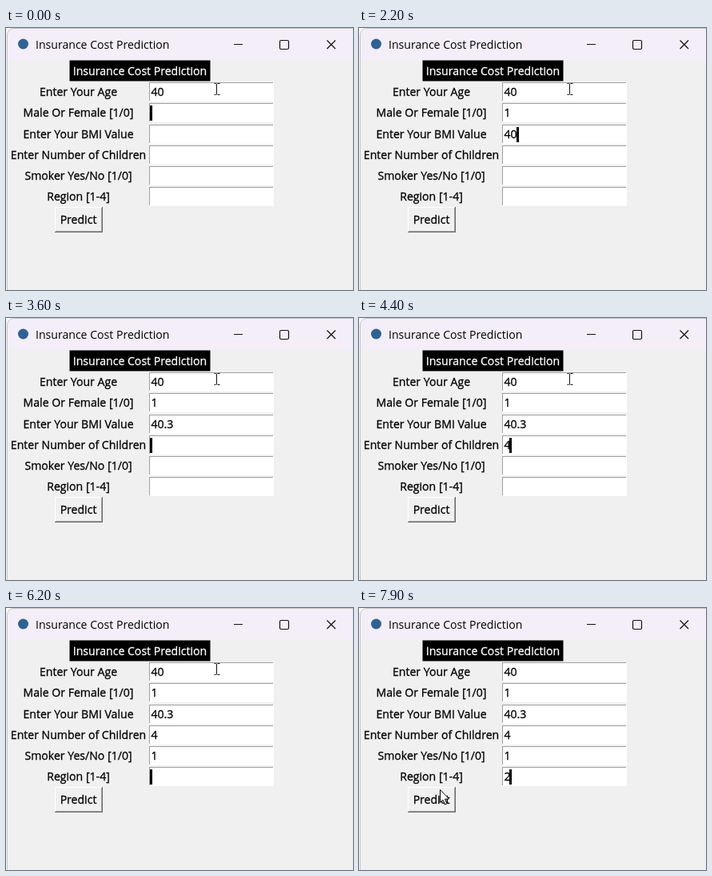
An HTML page with a canvas for the animation above (8 s loop, 434 by 328 pixels).

```html
<!DOCTYPE html>
<html lang="en">
<head>
<meta charset="utf-8">
<title>Insurance Cost Prediction</title>
<style>
  html, body { margin: 0; width: 100%; height: 100%; overflow: hidden; background: #f0f0f0; }
  canvas { display: block; }
</style>
</head>
<body>
<canvas id="stage" width="434" height="328"></canvas>
<script>
const ctx = document.getElementById('stage').getContext('2d');
const LOOP = 8000, STEP = 100;
const LABELS = ['Enter Your Age', 'Male Or Female [1/0]', 'Enter Your BMI Value',
  'Enter Number of Children', 'Smoker Yes/No [1/0]', 'Region [1-4]'];

// [time, focused row, text in that row]
const EVENTS = [
  [0, 1, ''], [700, 1, '1'],
  [1500, 2, ''], [1800, 2, '4'], [2100, 2, '40'], [2700, 2, '40.'], [3000, 2, '40.3'],
  [3500, 3, ''], [4200, 3, '4'],
  [4700, 4, ''], [5200, 4, '1'],
  [5800, 5, ''], [6500, 5, '2']
];

// [time, x, y] of the pointer
const POINTER = [[0, 263, 76], [7100, 263, 76], [7300, 225, 185],
  [7500, 150, 282], [7700, 101, 227], [LOOP, 101, 227]];

const rowY = i => Math.round(80 + i * 26.25);

function rect(color, x, y, w, h) {
  ctx.fillStyle = color;
  ctx.fillRect(x, y, w, h);
}

// A hairline outline gives the form text its heavier weight
function text(s, x, y, { align = 'left', color = '#000', weight = 0.3 } = {}) {
  ctx.fillStyle = ctx.strokeStyle = color;
  ctx.textAlign = align;
  ctx.fillText(s, x, y);
  if (weight) {
    ctx.lineWidth = weight;
    ctx.strokeText(s, x, y);
  }
}

function line(points, width = 1, color = '#111') {
  ctx.strokeStyle = color;
  ctx.lineWidth = width;
  ctx.beginPath();
  points.forEach(([x, y]) => ctx.lineTo(x, y));
  ctx.stroke();
}

// Nested rectangles, outermost first: top/left colour, bottom/right colour
function bevel(x, y, w, h, rings, fill) {
  for (const [topLeft, bottomRight] of rings) {
    rect(bottomRight, x, y, w, h);
    rect(topLeft, x, y, w - 1, h - 1);
    x++; y++; w -= 2; h -= 2;
  }
  rect(fill, x, y, w, h);
}

function drawWindow() {
  rect('#f0f0f0', 0, 0, 434, 328);
  rect('#fafafa', 0, 0, 434, 40);
  ctx.fillStyle = '#f3eef8';
  ctx.beginPath();
  ctx.roundRect(2, 1, 440, 39, [8, 0, 0, 0]);
  ctx.fill();
  rect('#f3eef8', 2, 40, 341, 1);
  rect('#fafafa', 0, 8, 1, 320);
  rect('#c4c4c4', 1, 8, 1, 320);
  line([[9, 0.5], [434, 0.5]], 1, '#c4c4c4');
  ctx.beginPath();
  ctx.arc(9.5, 8.5, 8, Math.PI, Math.PI * 1.5);
  ctx.stroke();

  ctx.fillStyle = '#2f6294';
  ctx.beginPath();
  ctx.arc(21.5, 20, 6.5, 0, 7);
  ctx.fill();
  text('Insurance Cost Prediction', 37, 26, { weight: 0 });

  line([[285, 20.5], [296, 20.5]]);
  ctx.lineWidth = 1.2;
  ctx.beginPath();
  ctx.roundRect(342.5, 15.5, 11, 11, 1.5);
  ctx.stroke();
  line([[401.5, 15.5], [412, 26]], 1.2);
  line([[412, 15.5], [401.5, 26]], 1.2);
}

function drawForm(values) {
  rect('#000', 79.5, 40.5, 176, 26);
  text('Insurance Cost Prediction', 167.5, 59, { align: 'center', color: '#fff' });
  LABELS.forEach((label, i) => {
    const y = rowY(i);
    text(label, 90.5, y + 5, { align: 'center' });
    bevel(179, y - 12, 156, 24, [['#a0a0a0', '#fff']], '#fff');
    text(values[i], 181.5, y + 5);
  });
  bevel(61, 224, 60, 32, [['#fff', '#696969'], ['#f0f0f0', '#a0a0a0']], '#f0f0f0');
  text('Predict', 90.5, 245, { align: 'center' });
}

function drawPointer(t) {
  const i = POINTER.findIndex(p => p[0] > t);
  const [t0, x0, y0] = POINTER[i - 1], [t1, x1, y1] = POINTER[i];
  const k = (t - t0) / (t1 - t0);
  const x = Math.round(x0 + (x1 - x0) * k), y = Math.round(y0 + (y1 - y0) * k);
  const overEntry = x > 179 && x < 335 && y > 67 && y < 223;
  ctx.save();
  ctx.translate(x + 0.5, y + 0.5);
  if (overEntry) {
    line([[0, -7], [0, 7]]);
    for (const s of [-7, 7]) {
      line([[-3, s], [-1, s]]);
      line([[1, s], [4, s]]);
    }
  } else {
    ctx.beginPath();
    [[0, 0], [0, 16], [3.5, 12.7], [6, 18.5], [8.5, 17.4], [6, 11.8], [11, 11.5]]
      .forEach(([px, py]) => ctx.lineTo(px, py));
    ctx.closePath();
    ctx.fillStyle = '#fff';
    ctx.fill();
    ctx.strokeStyle = '#000';
    ctx.lineWidth = 1;
    ctx.stroke();
  }
  ctx.restore();
}

function draw(now) {
  const t = Math.floor(now % LOOP / STEP) * STEP;
  const values = ['40', '', '', '', '', ''];
  let since = 0, row = 1;
  for (const [time, r, value] of EVENTS) {
    if (time > t) break;
    values[r] = value;
    since = time;
    row = r;
  }
  ctx.font = '14.1px "Open Sans", "Noto Sans", sans-serif';
  drawWindow();
  drawForm(values);
  // The caret is on for 600 ms and off for 300 ms after each key
  if ((t - since) % 900 < 600) {
    const x = Math.round(180.4 + ctx.measureText(values[row]).width);
    rect('#000', x, rowY(row) - 9, 3, 19);
  }
  drawPointer(t);
}

const start = performance.now();
function frame() {
  draw(performance.now() - start);
  requestAnimationFrame(frame);
}
frame();
</script>
</body>
</html>
```
